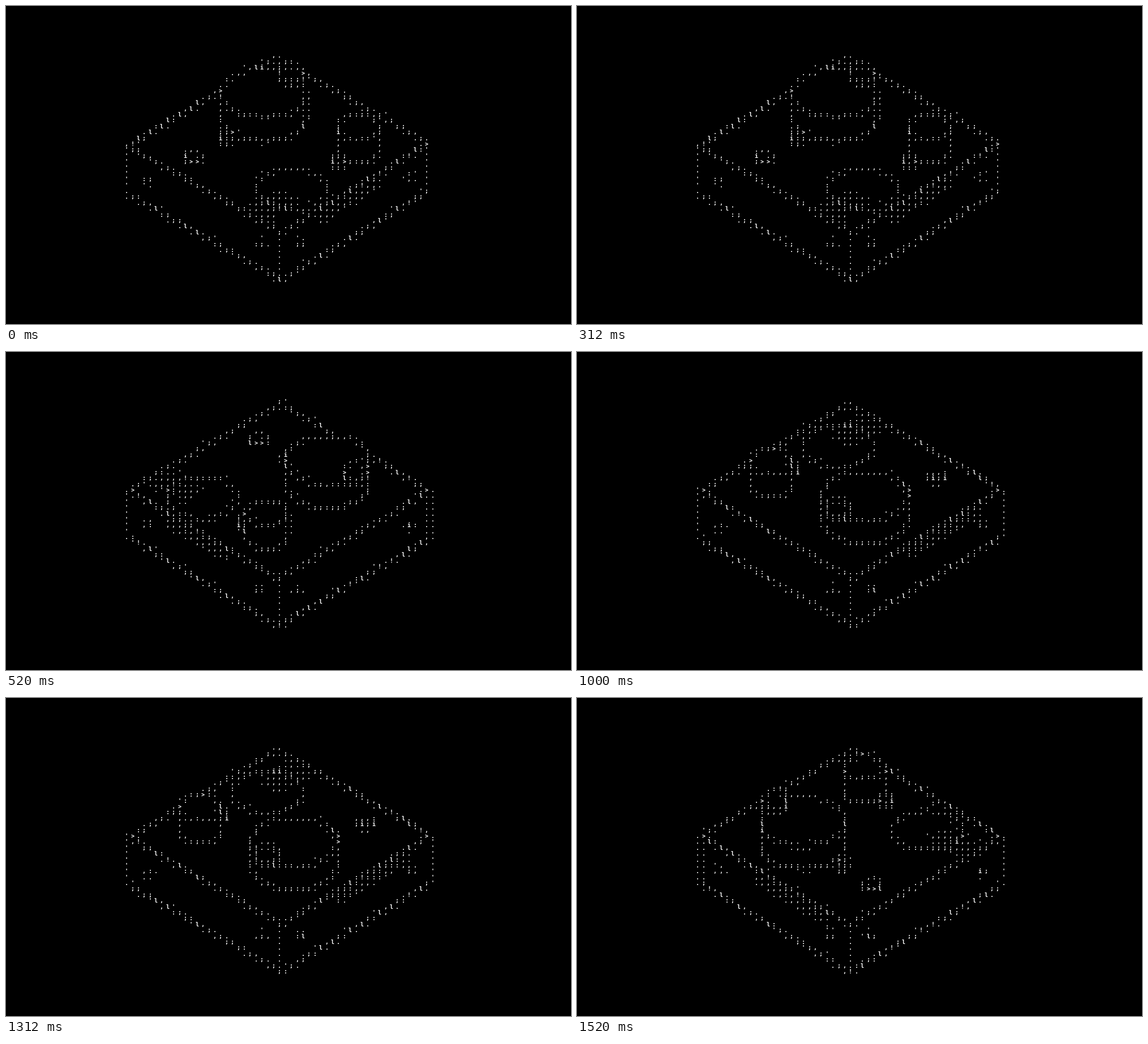
An HTML page with a canvas for the animation above (1960 ms loop, 998x561 px).

```html
<!DOCTYPE html>
<html lang="en">
<head>
<meta charset="utf-8">
<title>ASCII device</title>
<style>
  html, body { margin: 0; width: 100%; height: 100%; overflow: hidden; background: #000; }
  canvas { display: block; }
</style>
</head>
<body>
<canvas id="stage" width="998" height="561"></canvas>
<script>
const W = 998, H = 561, COLS = 96, ROWS = 54;
const CELL_W = W / COLS, CELL_H = H / ROWS;
const RAMP = " .'..,,:;;l!i>";
const LEVELS = 70;
const LOOP = 1960, TURNS = [520, 1000, 1520];
const RADIUS = 266, DEPTH = 84, TILT = 0.58, CENTER_Y = 245;
const SKEW = [-0.018, 0.01, -0.016, 0.01];

const stage = document.getElementById('stage').getContext('2d');
const plan = Object.assign(document.createElement('canvas'), { width: W, height: H })
  .getContext('2d', { willReadFrequently: true });

const CORNERS = [[0, RADIUS], [RADIUS, 0], [0, -RADIUS], [-RADIUS, 0]];
const CYLINDERS = [
  { x: 21, y: 135, r: 62, h: 0 },
  { x: -152, y: 38, r: 15, h: 4 },
  { x: -94, y: -15, r: 11, h: 9 },
  { x: 105, y: 60, r: 14, h: 8 },
  { x: 139, y: 20, r: 37, h: 41 },
  { x: -24, y: -86, r: 75, h: 41, pointer: { x: 25, y: -134, r: 22, h: 10, z: 41 } }
];

// Turns a point of the device into stage coordinates.
function projector(step) {
  const angle = step * Math.PI / 2 + SKEW[step];
  const c = Math.cos(angle), s = Math.sin(angle);
  return (x, y, z = 0) => [
    482 + step + x * c - y * s,
    CENTER_Y + (x * s + y * c) * TILT - z
  ];
}

function trace(points, strength = 1, closed = false) {
  plan.globalAlpha = strength;
  plan.beginPath();
  points.forEach(p => plan.lineTo(...p));
  if (closed) plan.closePath();
  plan.stroke();
}

function ellipse(x, y, r, end = Math.PI * 2) {
  plan.beginPath();
  plan.ellipse(x, y, r, r * TILT, 0, 0, end);
}

function drawCylinder(project, { x, y, r, h, z = 0, pointer }) {
  const [cx, base] = project(x, y, z);
  const top = base - h;
  plan.globalAlpha = 1;
  if (h) {
    ellipse(cx, base, r);
    plan.fill();
    plan.fillRect(cx - r, top, 2 * r, h);
    ellipse(cx, top, r);
    plan.fill();
    plan.globalAlpha = 0.8;
    ellipse(cx, base, r, Math.PI);
    plan.stroke();
    for (const side of [-r, r]) trace([[cx + side, top], [cx + side, base]], 0.5);
  }
  plan.globalAlpha = 0.7;
  ellipse(cx, top, r);
  plan.stroke();
  if (pointer) drawCylinder(project, pointer);
}

function drawWall(project, index) {
  const a = CORNERS[index], b = CORNERS[(index + 1) % 4];
  const at = (t, down) => project(a[0] + (b[0] - a[0]) * t, a[1] + (b[1] - a[1]) * t, -down);
  if (at(0.5, 0)[1] < CENTER_Y) return;

  trace([at(0, DEPTH), at(1, DEPTH)], 0.9);
  for (const t of [0, 1]) trace([at(t, 4), at(t, DEPTH)], 0.22);
  for (const t of [0.13, 0.87]) {
    plan.globalAlpha = 0.6;
    ellipse(...at(t, 41), 8);
    plan.stroke();
  }

  // Slots run along two opposite walls.
  if (index % 2 === 0) {
    const [from, to] = index ? [0.36, 0.86] : [0.25, 0.65];
    for (const down of [10, 21]) trace([at(from, down), at(to, down)], 0.6);
  }
}

function drawGrille(project) {
  for (let i = -2.5; i <= 2.5; i++) {
    const x = -12 + i * 10, y = 180 - i * 10;
    trace([project(x - 20, y - 20), project(x + 20, y + 20)], 0.55);
  }
}

function drawDevice(step) {
  const project = projector(step);
  plan.globalAlpha = 1;
  plan.fillStyle = '#000';
  plan.fillRect(0, 0, W, H);
  plan.strokeStyle = '#fff';
  plan.lineWidth = 1.4;

  trace(CORNERS.map(p => project(...p)), 0.9, true);
  CORNERS.forEach((_, i) => drawWall(project, i));
  drawGrille(project);
  [...CYLINDERS]
    .sort((a, b) => project(a.x, a.y)[1] - project(b.x, b.y)[1])
    .forEach(shape => drawCylinder(project, shape));
}

// Averages the drawing over each cell and picks a glyph by brightness.
function toText() {
  const { data } = plan.getImageData(0, 0, W, H);
  const sums = new Float32Array(COLS * ROWS);
  for (let y = 0; y < H; y++) {
    const row = Math.floor(y / CELL_H) * COLS;
    for (let x = 0; x < W; x++) {
      sums[row + Math.floor(x / CELL_W)] += data[(y * W + x) * 4];
    }
  }
  return Array.from(sums, sum => {
    const level = Math.round(sum / 255 / (CELL_W * CELL_H) * LEVELS);
    return RAMP[Math.min(level, RAMP.length - 1)];
  });
}

function show(glyphs) {
  stage.fillStyle = '#000';
  stage.fillRect(0, 0, W, H);
  stage.fillStyle = '#fff';
  stage.font = 'bold 10px "DejaVu Sans Mono", monospace';
  stage.textAlign = 'center';
  glyphs.forEach((glyph, i) => {
    if (glyph === ' ') return;
    const col = i % COLS, row = Math.floor(i / COLS);
    stage.fillText(glyph, Math.round((col + 0.5) * CELL_W), Math.round(row * CELL_H + 8));
  });
}

const poses = SKEW.map((_, step) => {
  drawDevice(step);
  return toText();
});

const start = performance.now();
let shown = -1;
function tick() {
  const time = (performance.now() - start) % LOOP;
  const step = TURNS.filter(turn => time >= turn).length;
  if (step !== shown) show(poses[shown = step]);
  requestAnimationFrame(tick);
}
tick();
</script>
</body>
</html>
```
